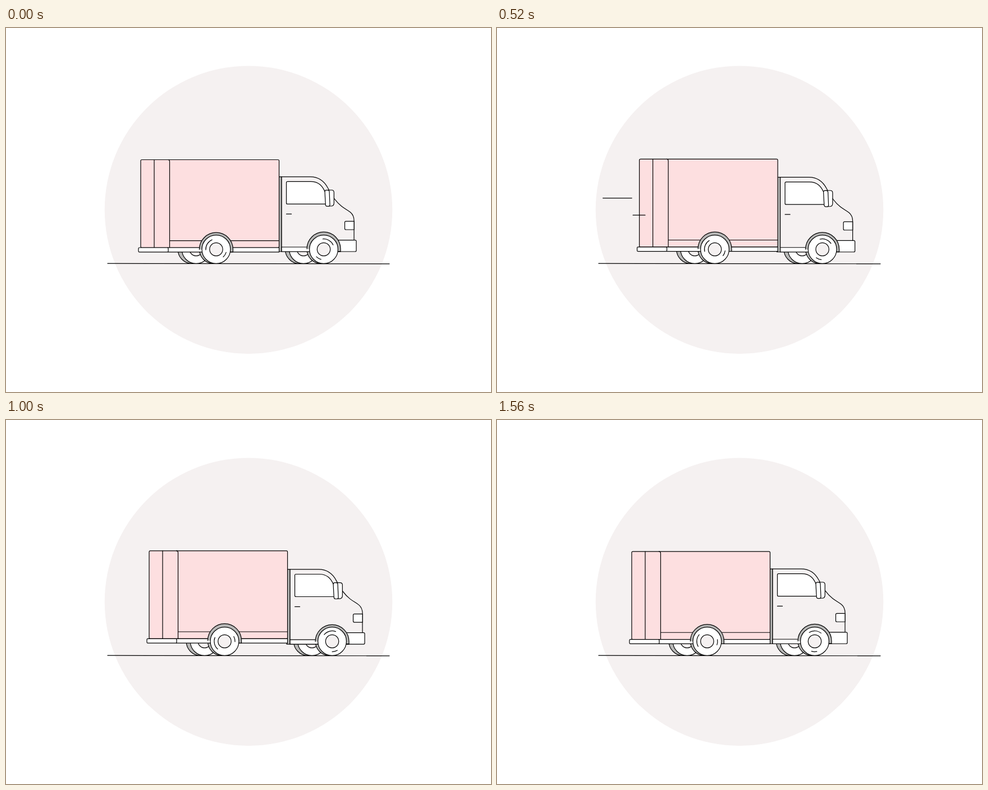
These frames come from a looping animation (864 by 648 pixels, 1.6 s). An HTML page:

```html
<!DOCTYPE html>
<html lang="en">
<head>
<meta charset="utf-8">
<title>Delivery truck</title>
<style>
  html, body { margin: 0; width: 100%; height: 100%; overflow: hidden; background: #fff; }
  svg { display: block; width: 100vw; height: 100vh; }
  .ink { stroke: #000; stroke-width: 1.2; stroke-linecap: round; stroke-linejoin: round; fill: none; }
  .white { fill: #fff; }
  .pale { fill: #f5f1f1; }
  .pink { fill: #fddfe0; }
  .gray { fill: #b8b8b7; }
</style>
</head>
<body>
<svg viewBox="0 0 864 648">
  <defs>
    <g id="tire">
      <circle class="white" r="25.4"/>
      <circle class="pale" r="11.7"/>
    </g>
    <g id="far">
      <circle class="gray" cx="-7.2" r="25.4"/>
      <use href="#tire"/>
    </g>
    <circle id="back" class="gray" cx="-4.6" r="25.4"/>
    <path id="arch" class="gray" d="M-30 0A30 30 0 0 1 30 0V4.4H20"/>
    <path id="marks" d="M15.2 -10.6A18.5 18.5 0 0 1 15.2 10.6M-17.9 4.8A18.5 18.5 0 0 1 -17.9 -4.8"/>
  </defs>

  <circle class="pale" cx="432" cy="323.7" r="256.3"/>

  <g class="ink">
    <path d="M181 419.2L683 419.8"/>
    <g id="truck">
      <use href="#far" x="338.7" y="394"/>
      <use href="#far" x="530" y="394"/>
      <use href="#back" x="374.4" y="394"/>
      <use href="#back" x="566" y="394"/>

      <g id="cab">
        <path class="gray" d="M485 264.8H491V398H485Z"/>
        <path class="pale" d="M491 264.8H542C558 264.8 567 272.5 573.5 285C580 298 587 309 598 317.5C604 322 609 324.5 613.5 328Q620 333.5 620 343V378H596V398H491Z"/>
        <path class="white" d="M501.5 273.4H543C557 273.4 563.5 281 568 291L571 298V313.4H501.5Q499.5 313.4 499.5 311.4V275.4Q499.5 273.4 501.5 273.4Z"/>
        <path d="M499.5 331.2H508.5"/>
        <rect class="white" x="491" y="390" width="50" height="8"/>
        <path class="white" d="M620 344.2H605.5Q603.5 344.2 603.5 346.2V357Q603.5 359 605.5 359H620Z"/>
        <rect class="white" x="588" y="377.6" width="36" height="20.4" rx="2"/>
        <path class="white" d="M573 288.5H580Q584.3 288.5 584.3 293V311Q584.3 316.5 580 317H574Z"/>
        <path class="white" d="M570.5 288.6H573Q575.8 288.6 576 291.5L577 314.5Q577 317.4 574.5 317.4H572Q569.4 317.4 569.2 314.5L568 291.5Q568 288.6 570.5 288.6Z"/>
        <use href="#arch" x="566" y="393.2"/>
      </g>

      <g id="box">
        <rect class="pink" x="240" y="234.5" width="246.5" height="156.5" rx="2"/>
        <path d="M264 234.5V391M288.5 234.5Q291.5 234.5 291.5 237.5V391M291.5 378.6H486.5"/>
        <rect class="white" x="288.5" y="391" width="198" height="7.8"/>
        <rect class="white" x="236" y="391" width="53" height="7.8" rx="1.6"/>
        <use href="#arch" x="374.4" y="394.2"/>
      </g>

      <g transform="translate(374.4 394)"><use href="#tire"/><use href="#marks" id="rear"/></g>
      <g transform="translate(566 394)"><use href="#tire"/><use href="#marks" id="front"/></g>
    </g>
    <g id="wind"></g>
  </g>
</svg>
<script>
const LOOP = 1600, STEP = 40, TURN = 780;
const $ = id => document.getElementById(id);
const clamp = u => Math.min(1, Math.max(0, u));
const easeOut = u => 1 - (1 - u) ** 2;
const smooth = u => u * u * (3 - 2 * u);

// Ease with horizontal handles at x = a and x = b
function ease(a, b, x) {
  let lo = 0, hi = 1;
  for (let i = 0; i < 24; i++) {
    const s = (lo + hi) / 2, r = 1 - s;
    if (3 * s * r * r * a + 3 * s * s * r * b + s ** 3 < x) lo = s; else hi = s;
  }
  return smooth(lo);
}

function sample(keys, t) {
  const i = keys.findIndex(k => k[0] > t);
  const [t0, v0] = keys[i - 1], [t1, v1] = keys[i];
  return v0 + (v1 - v0) * (t - t0) / (t1 - t0);
}

const lift = [[0, 0], [320, .45], [520, .68], [680, .78], [1000, 1], [1320, .7], [1560, .22], [LOOP, 0]];

// Streaks run leftwards from x0 to x1; head and tail are time spans
const streaks = [
  { y: 364.4, x0: 267, x1: 205, head: [130, 460], tail: [295, 515] },
  { y: 302.8, x0: 245, x1: 167, head: [345, 715], tail: [447, 932] },
  { y: 333.2, x0: 264, x1: 183, head: [457, 890], tail: [630, 990] }
];
for (const s of streaks) {
  s.el = document.createElementNS("http://www.w3.org/2000/svg", "path");
  $("wind").append(s.el);
}

const move = (id, value) => $(id).setAttribute("transform", value);
const span = ([a, b], t) => clamp((t - a) / (b - a));

function draw(t) {
  const x = t < TURN
    ? ease(.333, .45, t / TURN)
    : 1 - ease(.75, .6, clamp((t - TURN) / TURN));
  const up = sample(lift, t), spin = t * 1080 / LOOP;
  move("truck", `translate(${16 * x} 0)`);
  move("box", `translate(0 ${-1.6 * up})`);
  move("cab", `translate(0 ${1.1 * up})`);
  move("rear", `rotate(${212 + spin})`);
  move("front", `rotate(${300 + spin})`);
  for (const { el, y, x0, x1, head, tail } of streaks) {
    const h = x0 + (x1 - x0) * easeOut(span(head, t));
    const e = x0 + (x1 - x0) * smooth(span(tail, t));
    el.setAttribute("d", e - h > .1 ? `M${h} ${y}H${e}` : "");
  }
}

const start = performance.now();
function tick() {
  const t = (performance.now() - start) % LOOP;
  draw(Math.floor(t / STEP) * STEP);
  requestAnimationFrame(tick);
}
tick();
</script>
</body>
</html>
```
